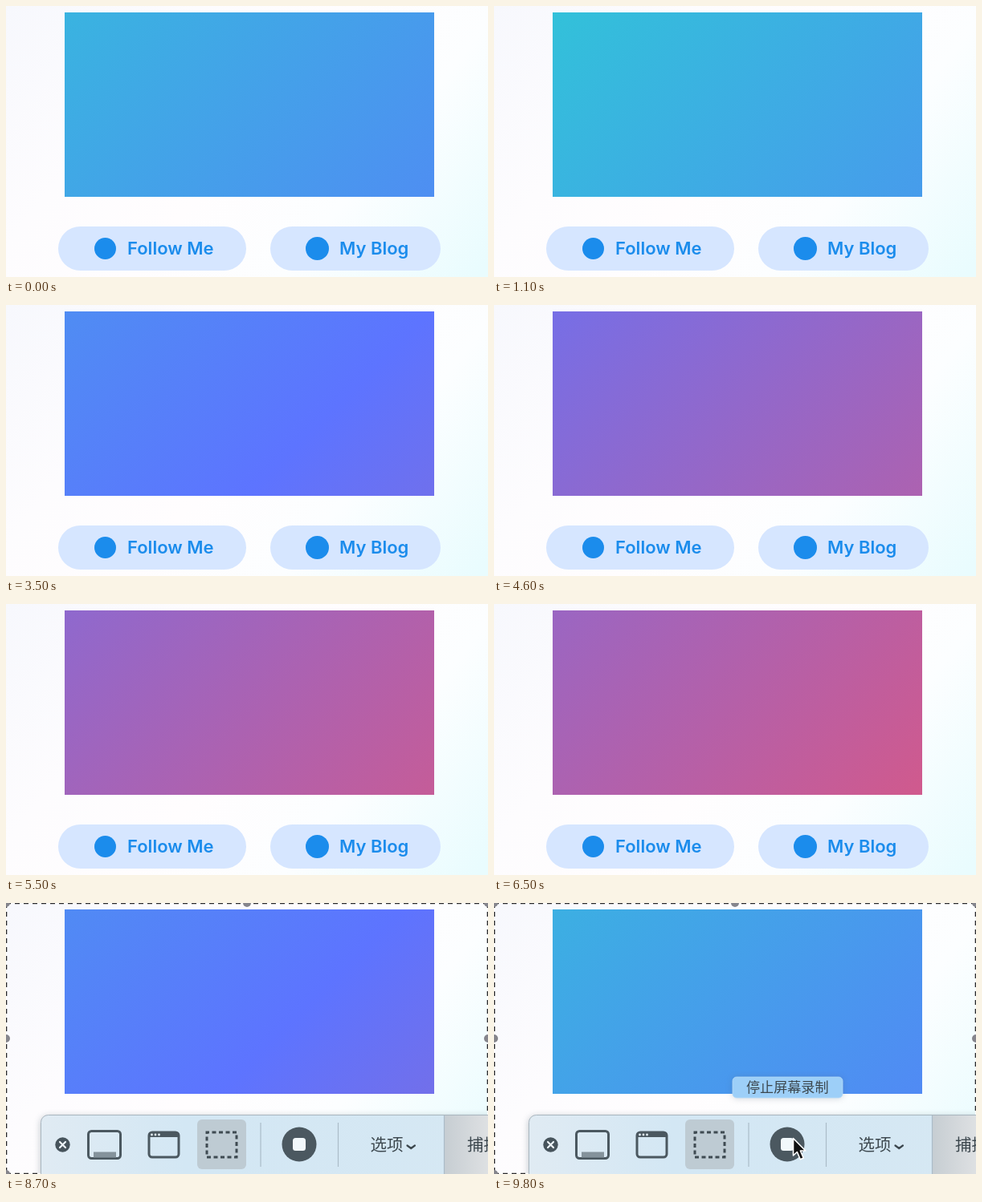
Recreate the animation shown at these times as an HTML page. Size 600 by 338 pixels, loop 9.9 s.

```html
<!DOCTYPE html>
<html lang="zh">
<head>
<meta charset="utf-8">
<style>
html, body { margin: 0; width: 100%; height: 100%; overflow: hidden; background: #fff; }
svg { display: block; width: 100%; height: 100%; }
.btn { font: 600 22px Inter, sans-serif; fill: #1b8cec; }
.cjk { font-family: "Noto Sans CJK SC", "Noto Sans CJK", sans-serif; fill: #3c474e; }
</style>
</head>
<body>
<svg viewBox="0 0 600 338" preserveAspectRatio="none">
  <defs>
    <linearGradient id="page" gradientUnits="userSpaceOnUse" x1="0" y1="0" x2="520" y2="420">
      <stop offset="0" stop-color="#f7f8fd"/>
      <stop offset=".28" stop-color="#fdfcfe"/>
      <stop offset=".5" stop-color="#fffdfe"/>
      <stop offset=".72" stop-color="#fcfeff"/>
      <stop offset="1" stop-color="#e9fcfe"/>
    </linearGradient>
    <linearGradient id="hue" gradientUnits="userSpaceOnUse">
      <stop offset="0" stop-color="#1fe3c9"/>
      <stop offset=".5" stop-color="#5d74ff"/>
      <stop offset="1" stop-color="#ff4f5f"/>
    </linearGradient>
    <linearGradient id="glass">
      <stop offset="0" stop-color="#e0ebf3"/>
      <stop offset=".3" stop-color="#d3e7f4"/>
      <stop offset="1" stop-color="#d6e8f3"/>
    </linearGradient>
    <linearGradient id="end">
      <stop offset="0" stop-color="#c6cdd2"/>
      <stop offset="1" stop-color="#e0e2e4"/>
    </linearGradient>
    <filter id="soft" x="-10%" y="-30%" width="120%" height="160%">
      <feGaussianBlur stdDeviation="4"/>
    </filter>
  </defs>

  <rect width="600" height="338" fill="url(#page)"/>
  <rect x="73" y="8" width="460" height="230" fill="url(#hue)"/>

  <g fill="#d6e6ff">
    <rect x="65" y="275" width="234" height="55" rx="27.5"/>
    <rect x="329" y="275" width="212" height="55" rx="27.5"/>
  </g>
  <g fill="#1b8cec">
    <circle cx="123.5" cy="302.5" r="13.5"/>
    <circle cx="387.5" cy="302.5" r="14.5"/>
  </g>
  <text class="btn" x="151" y="310">Follow Me</text>
  <text class="btn" x="415" y="310">My Blog</text>

  <g id="tools">
    <rect x="43" y="266" width="600" height="90" rx="9" fill="#5a6a78" opacity=".4" filter="url(#soft)"/>
    <g fill="none" stroke-width="2">
      <rect x="0" y="0" width="600" height="338" stroke="#fff"/>
      <path d="M0 .5H600M.5 0V338M599.5 0V338M0 337.5H600" stroke="#2c2c2e" stroke-width="1.6" stroke-dasharray="6 5"/>
    </g>
    <g id="knobs" fill="#85858c"></g>

    <rect x="43.5" y="264.5" width="600" height="90" rx="9" fill="url(#glass)" stroke="#a9b6bf"/>
    <rect x="545" y="265" width="60" height="80" fill="url(#end)"/>
    <path d="M317 274V329M413.5 274V329M545.5 265V338" stroke="#abbcc8" stroke-width="1.2"/>
    <rect x="238" y="270" width="61" height="62" rx="6" fill="#becbd3"/>

    <circle cx="70.5" cy="301.5" r="9.2" fill="#47545c"/>
    <path d="M67 298l7 7m0-7l-7 7" stroke="#eef5f9" stroke-width="2.2" stroke-linecap="round"/>

    <g fill="none" stroke="#4b5860" stroke-width="3">
      <rect x="102.5" y="284.5" width="40" height="34" rx="4"/>
      <rect x="178" y="286" width="37" height="31" rx="4"/>
      <rect x="250" y="286" width="37" height="31" stroke="#3f4b52" stroke-dasharray="5 3.5" stroke-dashoffset="2"/>
    </g>
    <rect x="109" y="310.5" width="28" height="7" fill="#84929b"/>
    <path d="M178 292V288q0-2 2-2h33q2 0 2 2v4z" fill="#4b5860"/>
    <g fill="#e3eef5">
      <circle cx="181.500" cy="289" r="1.4"/>
      <circle cx="186" cy="289" r="1.4"/>
      <circle cx="190.500" cy="289" r="1.4"/>
    </g>

    <circle cx="365" cy="301" r="21.5" fill="#4b5860"/>
    <rect x="357" y="293" width="16" height="16" rx="3.500" fill="#f2f8fb"/>

    <text class="cjk" x="453.500" y="309" font-size="20.500">选项</text>
    <path d="M499.500 302.500l4.700 3.500 4.700-3.500" fill="none" stroke="#3c474e" stroke-width="2.200" stroke-linecap="round" stroke-linejoin="round"/>
    <text class="cjk" x="574" y="309" font-size="20.500">捕捉</text>
  </g>

  <g id="tip">
    <rect x="297" y="217.500" width="137" height="26" rx="5" fill="#456" opacity=".25" filter="url(#soft)"/>
    <rect x="297" y="217" width="137" height="26" rx="5" fill="#9dcff8" stroke="#b4daf8" stroke-width=".8"/>
    <text class="cjk" x="314" y="236" font-size="17.100">停止屏幕录制</text>
  </g>
  <path id="cursor" d="M0 0V21.500L4.800 17l4 9.300 4-1.700L8.900 15.500H15.300z" fill="#111" stroke="#fff" stroke-width="1.600" stroke-linejoin="round"/>
</svg>
<script>
const $ = id => document.getElementById(id);
const LOOP = 9900, STEP = 100;
const HALF = 5000, RISE = 2150;      // gradient swings forth and back, HALF ms each way
const BAR_AT = 8500, TIP_AT = 9600;
const MOVE = [9300, 9700];
const FROM = [420, 345], TO = [372.5, 293.5];

$("knobs").innerHTML = [[0, 0], [300, 0], [600, 0], [0, 169], [600, 169], [0, 338]]
  .map(([x, y]) => `<circle cx="${x}" cy="${y}" r="5"/>`).join("");

const bez = (a, b, s) => 3 * a * s * (1 - s) ** 2 + 3 * b * s * s * (1 - s) + s ** 3;

// CSS "ease": cubic-bezier(.25, .1, .25, 1)
function ease(x) {
  let lo = 0, hi = 1;
  for (let i = 0; i < 24; i++) {
    const mid = (lo + hi) / 2;
    if (bez(.25, .25, mid) < x) lo = mid; else hi = mid;
  }
  return bez(.1, 1, lo);
}

function swing(t) {
  const k = ((t - RISE + 2 * HALF) % (2 * HALF)) / HALF;
  return k < 1 ? ease(k) : 1 - ease(k - 1);
}

const show = (id, on) => $(id).setAttribute("visibility", on ? "visible" : "hidden");

function draw(t) {
  // 135deg gradient on a layer six times the box, centred vertically
  const x = 73 - 2300 * swing(t), y = 8 - 575, g = $("hue");
  g.setAttribute("x1", x);
  g.setAttribute("y1", y);
  g.setAttribute("x2", x + 2070);
  g.setAttribute("y2", y + 2070);

  show("tools", t >= BAR_AT);
  show("tip", t >= TIP_AT);
  show("cursor", t >= MOVE[0]);
  const m = ease(Math.min(1, Math.max(0, (t - MOVE[0]) / (MOVE[1] - MOVE[0]))));
  const at = FROM.map((a, i) => a + (TO[i] - a) * m);
  $("cursor").setAttribute("transform", `translate(${at})`);
}

const start = performance.now();
function tick() {
  const t = (performance.now() - start) % LOOP;
  draw(Math.floor(t / STEP) * STEP);
  requestAnimationFrame(tick);
}
draw(0);
requestAnimationFrame(tick);
</script>
</body>
</html>
```
